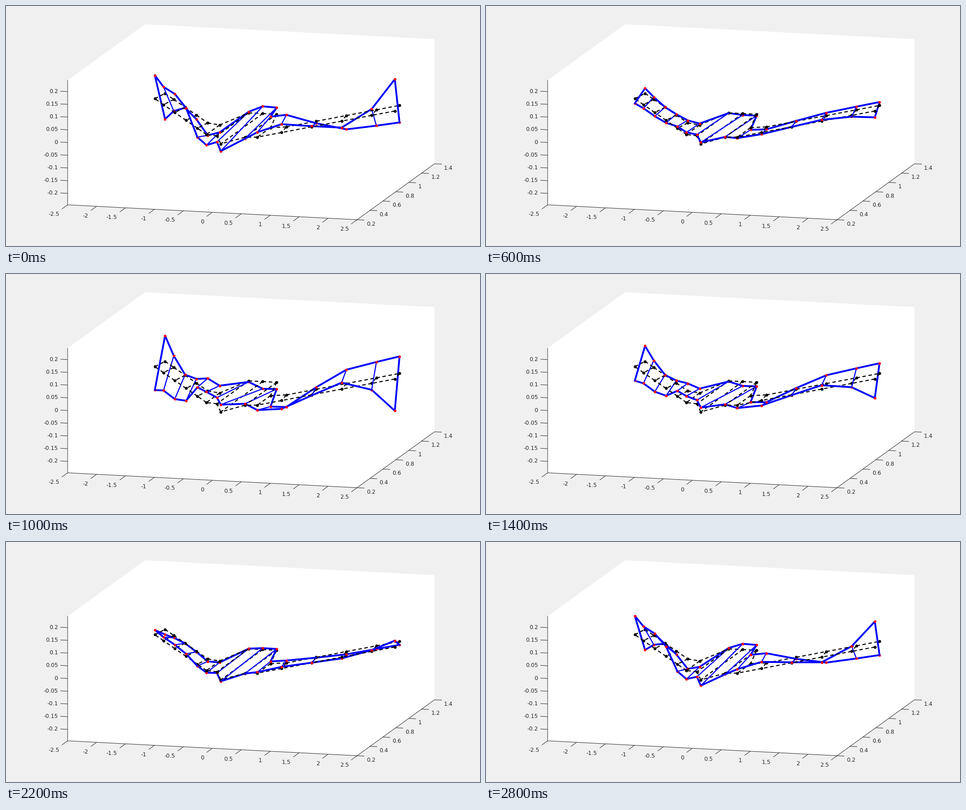
A matplotlib script for the animation above (3000 ms loop, 1053 by 532 pixels).

```python
import numpy as np
import matplotlib.pyplot as plt
from matplotlib.animation import FuncAnimation
from matplotlib.collections import LineCollection

W, H, DPI = 1053, 532, 64
PX = 72 / DPI  # points per pixel
FRAMES, INTERVAL = 15, 200
INK = "#262626"
X0, X1, Y0, Y1, ZMAX = -2.5, 2.5, 0.2, 1.4, 0.245

fig = plt.figure(figsize=(W / DPI, H / DPI), dpi=DPI, facecolor="#f0f0f0")
ax = fig.add_axes([0, 0, 1, 1])
ax.set_xlim(0, W)
ax.set_ylim(H, 0)
ax.axis("off")


def project(x, y, z=0.0):
    """Orthographic view of a 3D point in screen pixels."""
    return np.array([429.8 + 128.6 * x + 143.3 * y,
                     339.7 + 6.6 * x - 103.3 * y - 564 * z])


def rule(*points):
    ax.plot(*zip(*points), color=INK, lw=PX, zorder=0.5,
            solid_capstyle="butt")


def tick(start, end, value, offset, align):
    a, b = project(*start), project(*end)
    rule(a, b)
    ax.text(*(a + offset), f"{value:g}", color=INK, fontsize=12.4 * PX,
            family="DejaVu Sans", ha=align, va="center")


def draw_box():
    top, left = project(X0, Y0, ZMAX), project(X0, Y0, -ZMAX)
    corner, right = project(X1, Y0, -ZMAX), project(X1, Y1, -ZMAX)
    back = project(X0, Y1, ZMAX), project(X1, Y1, ZMAX)
    ax.fill(*zip(top, *back, right, corner, left), color="white", lw=0,
            zorder=0)
    rule(top, left, corner, right)
    for x in np.arange(-5, 6) / 2:
        tick((x, Y0, -ZMAX), (x, Y0 - 0.09, -ZMAX), x, (-18.5, 21), "right")
    for y in np.arange(1, 8) / 5:
        tick((X1, y, -ZMAX), (X1 + 0.125, y, -ZMAX), y, (21, 9.5), "left")
    for z in np.arange(-4, 5) / 20:
        tick((X0, Y0, z), (X0 - 0.125, Y0, z), z, (-21.5, -0.5), "right")


def mode_shape(span, chord):
    """Vertical swing in pixels; chord is 1 at the rear edge, -1 in front."""
    u, side = np.abs(span), np.sign(span)
    twist = -16 + 36 * u - 25 * u**2 + 11.2 * u**3
    bend = (-22 * np.sin(np.pi * u)
            + 12 * np.exp(-u) * np.sin(2 * np.pi * u)
            - 0.35 * u**4 - 4.5 * chord * u**2 * (2.15 - u))
    ripple = -6 * u * np.cos(2 * np.pi * (u - 1.08) / 1.1) if chord < 0 else 0
    return chord * twist + side * bend + ripple


# Swept wing: body stations, evenly spaced ribs, then the tip.
half = np.concatenate([[0, 0.242, 0.44], 0.727 + 0.357 * np.arange(4), [2.073]])
front = np.concatenate([-half[:0:-1], half])
rear = front - 0.048 * np.sign(front) * (np.abs(front) > 0.5)
front_y = np.interp(np.abs(front), [0, 0.242, 0.44, 2.073],
                    [0.33, 0.488, 0.503, 1.168])
rear_y = np.interp(np.abs(rear), [0.242, 0.44, 0.68, 2.025],
                   [0.98, 0.707, 0.737, 1.284])
rest = np.vstack([project(rear, rear_y).T, project(front, front_y).T])
swing = np.concatenate([mode_shape(rear, 1), mode_shape(front, -1)])

N = len(front)
LOOP = np.r_[0:N, 2 * N - 1:N - 1:-1]
OUTLINE = np.column_stack([LOOP, np.roll(LOOP, -1)])
RUNGS = np.array([(i, i + N) for i in range(1, N - 1)])


def lines(width, color, z, **style):
    group = LineCollection([], linewidths=width * PX, colors=color,
                           zorder=z, **style)
    return ax.add_collection(group, autolim=False)


def dots(size, color, z):
    return ax.scatter([], [], s=(size * PX) ** 2, c=color, linewidths=0,
                      zorder=z)


draw_box()
dashed = lines(2.3, "black", 3, linestyles=[(0, (3.4, 2.5))])
dashed.set_segments(rest[np.vstack([OUTLINE, RUNGS])])
dots(6.6, "black", 4).set_offsets(rest)

# The moving shape passes behind the rest shape where it sinks below it.
layers = [
    (lines(4, "blue", z, capstyle="round"), lines(2.4, "blue", z),
     dots(5.8, "red", z + 0.5))
    for z in (1, 5)
]


def phase(frame):
    """Fast stroke over a third of the loop, slow return."""
    return 1 - 0.4 * frame if frame <= 5 else -1 + 0.2 * (frame - 5)


def update(frame):
    shift = phase(frame) * swing
    pts = rest + np.column_stack([np.zeros_like(shift), shift])
    for (outline, rungs, joints), in_front in zip(layers, (False, True)):
        for group, pairs in ((outline, OUTLINE), (rungs, RUNGS)):
            keep = (shift[pairs].sum(axis=1) <= 0) == in_front
            group.set_segments(pts[pairs[keep]])
        joints.set_offsets(pts[(shift <= 0) == in_front])
    return [artist for layer in layers for artist in layer]


anim = FuncAnimation(fig, update, frames=FRAMES, interval=INTERVAL,
                     init_func=lambda: update(0), repeat=True,
                     repeat_delay=0, blit=False)
plt.show()
```
